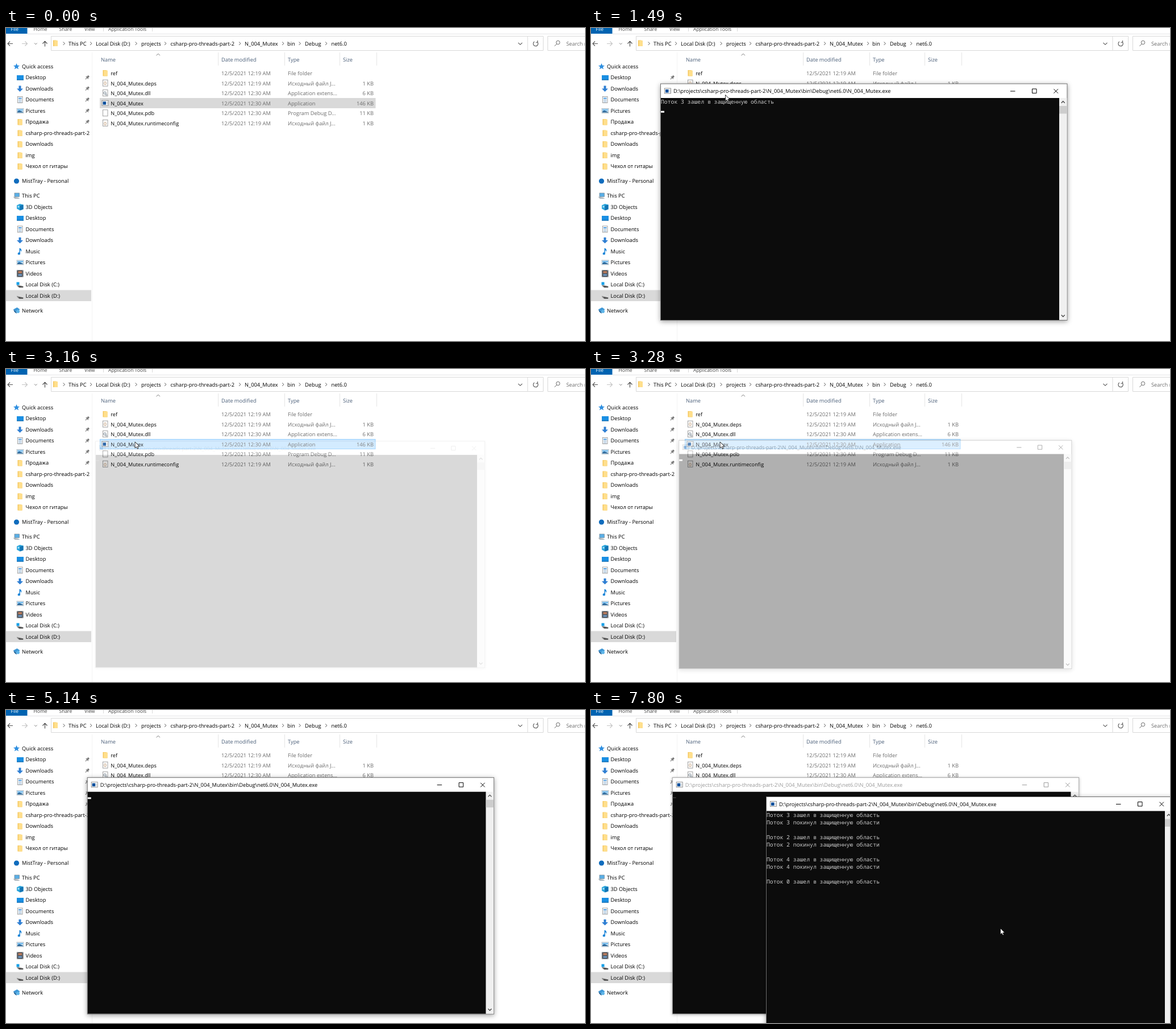
Write an HTML page that moves like this. It is 1019 by 550 pixels and loops after 8000 ms.

```html
<!DOCTYPE html>
<html lang="en">
<head>
<meta charset="utf-8">
<title>Mutex demo</title>
<style>
html, body { margin: 0; width: 100%; height: 100%; overflow: hidden; background: #fff; }
svg { display: block; width: 1019px; height: 550px; }
text { font: 9.3px "Open Sans", "Noto Sans", sans-serif; text-rendering: geometricPrecision; white-space: pre; }
.title { font-size: 9.25px; }
.tab { font-size: 8.5px; }
.file { font-size: 9.15px; }
.con { font: 9.75px "Noto Sans Mono", "DejaVu Sans Mono", monospace; fill: #ccc; }
</style>
</head>
<body>
<svg id="stage" viewBox="0 0 1019 550"></svg>
<script>
const LOOP = 8000;
const GREY = '#6d6d6d';
const stage = document.getElementById('stage');

const rect = (x, y, w, h, fill, extra = '') =>
  `<rect x="${x}" y="${y}" width="${w}" height="${h}" fill="${fill}" ${extra}/>`;
const line = (d, color, width = 1, extra = '') =>
  `<path d="${d}" fill="none" stroke="${color}" stroke-width="${width}" ${extra}/>`;
const shape = (d, fill) => `<path d="${d}" fill="${fill}"/>`;
const text = (x, y, s, fill = '#000', extra = '') =>
  `<text x="${x}" y="${y}" fill="${fill}" ${extra}>${s}</text>`;
const at = (x, y, s) => `<g transform="translate(${x} ${y})">${s}</g>`;

// Icons are drawn around their own centre.
const page = rect(-4, -5.5, 8.5, 11, '#fff', 'stroke="#8a8a8a" stroke-width=".8"');
const disk = shape('M-5.5 0L-3 -.8L6 2.2V3Z', '#dcdcdc') + shape('M-5.5 .2L6 3V5H-1.5Q-5.5 3 -5.5 .2Z', '#8c8c8c') +
  shape('M-3 2.6L5.5 3.4V5H-1Z', '#3d3d3d');
const icons = {
  folder: shape('M-4 -5H1L4 -4V5.5H-4Z', '#f5c65b') + shape('M-2.5 -4.5H4V5.5H-2.5Z', '#ffdf8c'),
  star: shape('M0 -5.5L1.6 -1.8L5.5 -1.5L2.5 1L3.5 5L0 2.8L-3.5 5L-2.5 1L-5.5 -1.5L-1.6 -1.8Z', '#2f8fe0'),
  desktop: rect(-5.5, -4, 12, 8.5, '#1a8fe3') + rect(-5.5, 3.5, 12, 1, '#0c5f9e'),
  down: shape('M-2 -5H2V0H5.5L0 5.5L-5.5 0H-2Z', '#2f7fd3'),
  doc: page + rect(-2.5, -3.5, 5.5, 2, '#4d9be0') + line('M-2.5 0H3M-2.5 2H3M-2.5 4H3', '#7fa6c9', .8),
  picture: rect(-5.5, -4, 12, 8, '#eef4f8', 'stroke="#9aa7b0" stroke-width=".7"') +
    rect(-4.5, -3, 10, 3, '#7fc0ee') + shape('M-4.5 3V1L-1 -.8L5.5 2V3Z', '#2d6a9c'),
  disc: '<circle r="4.6" fill="#0f6cbd"/>',
  pc: rect(-3.5, -5, 8.5, 6.5, '#5aaee6', 'stroke="#77838c" stroke-width=".7"') +
    shape('M-6 1.5L3 3L6 5H-3Z', '#a9b3ba'),
  cube: shape('M-5.5 -3L0 -5.5L6 -4V4L0 6L-5.5 3Z', '#2aa5dc') + shape('M0 -2.5L6 -4V4L0 6Z', '#1274b3') +
    rect(-4, -2, 3, 3, '#a4e1f8'),
  music: shape('M-1 -5.5H.5Q4 -3 2.5 1Q2 -2 .5 -2V3.5A2.2 2 0 1 1 -1 2Z', '#1f86d8'),
  film: rect(-5.5, -6, 11.5, 12, '#3c4249') + rect(-3, -4.5, 6.5, 4, '#b77b5d') + rect(-3, .5, 6.5, 4, '#6a8fb5') +
    line('M-4.3 -5.5V6M4.8 -5.5V6', '#d6d6d6', 1, 'stroke-dasharray="1 1"'),
  disk,
  diskC: disk + rect(-6, -4.5, 5, 5, '#18a0e8'),
  net: shape('M-5.5 -2L1 -5.5L6 -2L0 3Z', '#3d97d6') + shape('M-5.5 -2L0 3V5.5L-4 2Z', '#1b5f96') +
    '<circle cx="2.5" cy="1.5" r="3" fill="#5fb5e8"/>',
  json: page + text(-2.7, 2.8, '{}', '#a5703c', 'style="font-size:7px"'),
  dll: page + '<circle r="2" cx="-.5" fill="none" stroke="#8d99a3" stroke-width="1.2"/><circle r="1.2" cx="2" cy="3" fill="none" stroke="#8d99a3"/>',
  page,
  exe: rect(-5.5, -4.5, 11, 9, '#fff', 'stroke="#777" stroke-width=".8"') + rect(-4, -2.5, 5.5, 5.5, '#0a4f9c') +
    rect(2.5, -2.5, 2, 5.5, '#cfd6dc'),
  pin: `<g transform="rotate(45)">${rect(-1.6, -4, 3.2, 4, '#7a7a7a')}${line('M-3 .2H3M0 0V4.5', '#7a7a7a', 1.1)}</g>`
};

const places = [
  ['Quick access', 67.5, 'star', 0],
  ['Desktop', 87, 'desktop', 1], ['Downloads', 106.5, 'down', 1], ['Documents', 126, 'doc', 1],
  ['Pictures', 145.5, 'picture', 1], ['Продажа', 165, 'folder', 1],
  ['csharp-pro-threads-part-2', 184.4, 'folder', 2], ['Downloads', 204, 'folder', 2],
  ['img', 223.4, 'folder', 2], ['Чехол от гитары', 243, 'folder', 2],
  ['MistTray - Personal', 269, 'disc', 0], ['This PC', 295, 'pc', 0],
  ['3D Objects', 314.5, 'cube', 2], ['Desktop', 334, 'desktop', 2], ['Documents', 353.5, 'doc', 2],
  ['Downloads', 373, 'down', 2], ['Music', 392.5, 'music', 2], ['Pictures', 412, 'picture', 2],
  ['Videos', 431.5, 'film', 2], ['Local Disk (C:)', 451, 'diskC', 2], ['Local Disk (D:)', 470.5, 'disk', 2],
  ['Network', 496.5, 'net', 0]
];

const files = [
  ['ref', 'folder', '19', 'File folder', ''],
  ['N_004_Mutex.deps', 'json', '19', 'Исходный файл J...', '1 KB'],
  ['N_004_Mutex.dll', 'dll', '30', 'Application extens...', '6 KB'],
  ['N_004_Mutex', 'exe', '30', 'Application', '146 KB'],
  ['N_004_Mutex.pdb', 'page', '30', 'Program Debug D...', '11 KB'],
  ['N_004_Mutex.runtimeconfig', 'json', '19', 'Исходный файл J...', '1 KB']
];

const crumbs = [['This PC', 110], ['Local Disk (D:)', 158], ['projects', 238], ['csharp-pro-threads-part-2', 289.5],
  ['N_004_Mutex', 420], ['bin', 495], ['Debug', 526], ['net6.0', 572.5]];

function ribbon() {
  const tabs = [['Home', 48.5], ['Share', 93.5], ['View', 138], ['Application Tools', 180]];
  return rect(0, 0, 37.5, 10, '#0063b1') + text(8.5, 5, 'File', '#fff', 'class="tab"') +
    tabs.map(([s, x]) => text(x, 5, s, '#444', 'class="tab"')).join('') +
    line('M37.5 10.5H1019', '#e4e5e6') + line('M171.5 0V6M257.5 0V6', '#dadada');
}

function addressBar() {
  const seps = [102, 149.5, 229, 280.5, 411.5, 487.5, 517, 563.5];
  return line('M12 27.5H3.5M7 23.5L3 27.5L7 31.5', '#555', 1.1) +
    line('M28 27.5H37M33.5 23.5L37.5 27.5L33.5 31.5', '#c4c4c4', 1.1) +
    line('M50 26.5L52.3 28.8L54.6 26.5', '#777') +
    line('M68.5 32.5V23.5M64.5 27.5L68.5 23.3L72.5 27.5', '#444', 1.1) +
    line('M79.5 14.5H945.5V39.5H79.5ZM918 14.5V39.5', '#d9d9d9') +
    line('M1020 14.5H953.5V39.5H1020', '#d9d9d9') +
    at(87, 26.5, icons.folder) +
    seps.map(x => line(`M${x - 1.4} 24.5L${x + 1.4} 27.2L${x - 1.4} 30`, '#555')).join('') +
    crumbs.map(([s, x]) => text(x, 30.7, s)).join('') +
    line('M901.5 25.8L905 29.3L908.5 25.8', '#555', 1.1) +
    line('M935 24.5A4.2 4.2 0 1 1 930 24M935.6 22V25.2H932.4', '#555', 1.1) +
    '<circle cx="971.5" cy="25.5" r="3.2" fill="none" stroke="#666"/>' + line('M969.3 28L965.5 31.8', '#666') +
    text(986, 30.7, 'Search net6.0', GREY);
}

function sidebar() {
  return line('M151.5 43V550', '#f3f3f3') + rect(0, 460.5, 150, 19.5, '#d9d9d9') +
    places.map(([s, y, icon, kind]) =>
      at(kind ? 24.5 : 18.5, y, icons[icon]) + text(kind ? 34.5 : 28, y + 3.4, s) +
      (kind === 1 ? at(143, y, icons.pin) : '')).join('');
}

function fileList() {
  const heads = [['Name', 167], ['Date modified', 379], ['Type', 496], ['Size', 593]];
  return heads.map(([s, x]) => text(x, 58.6, s, '#4c607a')).join('') +
    line('M373.5 43V66M490.5 43V66M587.5 43V66M652.5 43V66', '#e5e5e5') +
    line('M264.7 48.3L267.8 45.2L270.9 48.3', '#777') +
    rect(165.5, 123.5, 484.5, 17, '#d9d9d9', 'id="row"') +
    files.map(([name, icon, min, type, size], i) => {
      const y = 79.6 + 17.55 * i, b = y + 3.4;
      return at(174.5, y - .5, icons[icon]) + text(184.3, b, name, '#000', 'class="file"') +
        text(379, b, `12/5/2021 12:${min} AM`, GREY) + text(496, b, type, GREY) +
        text(647, b, size, GREY, 'text-anchor="end"');
    }).join('');
}

const W = 715.5, H = 415.5;
const TITLE = 'D:\\projects\\csharp-pro-threads-part-2\\N_004_Mutex\\bin\\Debug\\net6.0\\N_004_Mutex.exe';

const consoleWindow = id => `<g id="${id}">
  ${rect(0, 0, W, H, '#fff', 'class="frame" stroke="#6e6e6e"')}
  ${at(12.5, 12.5, icons.exe)}
  ${text(22.5, 16.4, TITLE, '#000', 'class="title"')}
  <g class="buttons" fill="none" stroke="#000">
    <path d="M615.5 13H624M654 9H661.5V16.5H654ZM692 9.2L699.5 16.7M699.5 9.2L692 16.7"/>
  </g>
  ${rect(.5, 25, 701, H - 25.5, '#0c0c0c')}
  ${rect(701.5, 25, 13.5, H - 25.5, '#f0f0f0')}
  ${rect(701.5, 39, 13.5, 13.5, '#cdcdcd')}
  ${line('M705.3 33.7L708.3 30.7L711.3 33.7M705.3 406.3L708.3 409.3L711.3 406.3', '#444', 1.3)}
  <g class="lines"></g>
  ${rect(.5, 0, 6, 3, '#fff', 'class="caret"')}
</g>`;

stage.innerHTML = `<defs>
  <filter id="deep" x="-5%" y="-5%" width="110%" height="112%"><feDropShadow dx="0" dy="2" stdDeviation="4.5" flood-opacity=".38"/></filter>
  <filter id="soft" x="-5%" y="-5%" width="110%" height="112%"><feDropShadow dx="0" dy="1" stdDeviation="2.5" flood-opacity=".28"/></filter>
  </defs>` + rect(0, 0, 1019, 550, '#fff') + ribbon() + addressBar() + sidebar() + fileList() +
  consoleWindow('back') + consoleWindow('front') +
  `<path id="mouse" d="M0 0V11L2.5 8.7L4.2 12.3L6 11.5L4.4 8H7.8Z" fill="#fff" stroke="#000" stroke-width=".8"/>`;

const row = document.getElementById('row');
const mouse = document.getElementById('mouse');
const parts = id => {
  const el = document.getElementById(id);
  const find = c => el.querySelector('.' + c);
  return { el, frame: find('frame'), title: find('title'), buttons: find('buttons'), lines: find('lines'), caret: find('caret'), log: '' };
};
const front = parts('front'), back = parts('back');

// Progress 0..1 from a to b in n discrete pictures.
function steps(t, a, b, n) {
  const k = Math.floor((t - a) / (b - a) * (n - 1) + 1e-6);
  return Math.min(1, Math.max(0, k / (n - 1)));
}
const ease = p => p * p * (3 - 2 * p);
const mix = (a, b, p) => a + (b - a) * p;
const within = (t, a, b) => t >= a && t < b;

function drawWindow(w, s) {
  w.el.style.display = s.show ? '' : 'none';
  if (!s.show) return;
  const k = s.scale ?? 1;
  w.el.setAttribute('transform',
    `translate(${s.x + W / 2 * (1 - k)} ${s.y + H / 2 * (1 - k)}) scale(${k})`);
  w.el.setAttribute('opacity', s.alpha ?? 1);
  w.frame.setAttribute('filter', s.active ? 'url(#deep)' : 'url(#soft)');
  w.frame.setAttribute('stroke', s.active ? '#6e6e6e' : '#a0a0a0');
  w.title.setAttribute('fill', s.active ? '#000' : '#999');
  w.buttons.setAttribute('stroke', s.active ? '#000' : '#999');
  const log = s.log.join('\n');
  if (log !== w.log) {
    w.log = log;
    w.lines.innerHTML = s.log.map((l, i) => text(.5, 35.3 + 13 * i, l, '#ccc', 'class="con"')).join('');
  }
  w.caret.setAttribute('y', 34.7 + 13 * s.log.length);
  w.caret.setAttribute('height', s.active ? 3 : 1.5);
  w.caret.setAttribute('fill', s.active ? '#fff' : '#3a3a3a');
  w.caret.style.display = s.caret ? '' : 'none';
}

const enter = n => `Поток ${n} зашел в защищенную область`;
const leave = n => `Поток ${n} покинул защищенную области`;

function logAt(t) {
  if (t < 1230) return [];
  if (t < 5000) return [enter(3)];
  const log = [enter(3), leave(3), '', enter(2), leave(2), '', enter(4)];
  return t < 6920 ? log : log.concat(leave(4), '', enter(0));
}

function frontAt(t) {
  const drag = ease(steps(t, 1490, 2250, 12));
  const grow = mix(.15, 1, steps(t, 960, 1300, 6));
  const raised = t >= 5490;
  return {
    show: within(t, 960, 2860) || raised,
    x: 122.5 + 186 * drag, y: 98 + 54.5 * drag,
    scale: .95 + .05 * grow,
    alpha: raised ? mix(.2, 1, steps(t, 5490, 5830, 5)) : grow,
    active: true,
    log: logAt(t),
    caret: t < 2020 || within(t, 2550, 2860)
  };
}

function backAt(t) {
  const grow = mix(.15, 1, steps(t, 3160, 3480, 6));
  return {
    show: t >= 3160,
    x: mix(142.2, 143.2, grow), y: mix(118, 118.7, grow),
    scale: .95 + .05 * grow,
    alpha: grow,
    active: within(t, 3220, 4080) || within(t, 4300, 5350),
    log: [],
    caret: t < 3680 || within(t, 4150, 4610) || t >= 5140
  };
}

// Start, end, pictures, from, to; the pointer rests after each move.
const moves = [
  [70, 820, 11, [938, 518], [226, 126.5]],
  [1164, 1300, 3, [226, 126.5], [236.5, 117.5]],
  [1490, 2250, 12, [236.5, 117.5], [422.5, 172]],
  [2310, 2660, 6, [422.5, 172], [226, 126.5]],
  [3080, 3160, 2, [226, 126.5], [227, 128]],
  [6030, 6790, 12, [560, 549], [627, 381]],
  [7590, 7800, 4, [627, 381], [720.5, 383.5]]
];

function drawMouse(t) {
  const shown = within(t, 70, 3290) || t >= 6030;
  mouse.style.display = shown ? '' : 'none';
  if (!shown) return;
  const [a, b, n, from, to] = moves.filter(m => t >= m[0]).pop();
  const p = ease(steps(t, a, b, n));
  mouse.setAttribute('transform', `translate(${mix(from[0], to[0], p)} ${mix(from[1], to[1], p)})`);
}

function draw(t) {
  const hot = t >= 670;
  row.setAttribute('fill', hot ? '#cce8ff' : '#d9d9d9');
  row.setAttribute('stroke', hot ? '#99d1ff' : '#d9d9d9');
  drawWindow(back, backAt(t));
  drawWindow(front, frontAt(t));
  drawMouse(t);
}

function tick() {
  draw(performance.now() % LOOP);
  requestAnimationFrame(tick);
}
tick();
</script>
</body>
</html>
```
